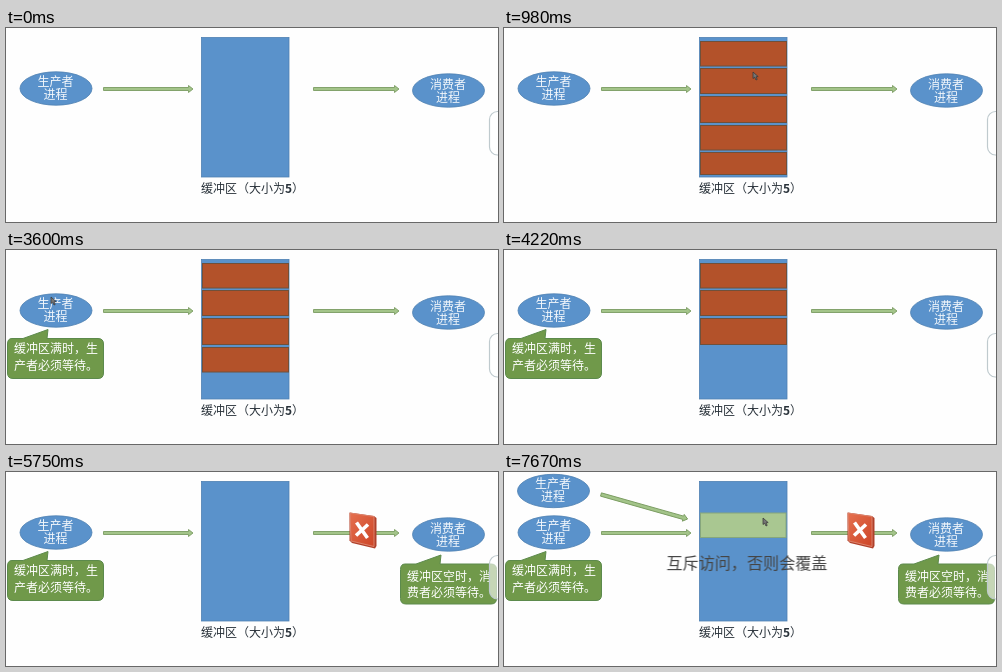
An HTML page for the animation above (8.3 s loop, 492 by 194 pixels).

```html
<!DOCTYPE html>
<html lang="zh">
<head>
<meta charset="utf-8">
<title>生产者与消费者</title>
<style>
html, body { margin: 0; width: 100%; height: 100%; overflow: hidden; background: #fefefe; }
svg { display: block; width: 492px; height: 194px; font: 12px "Noto Sans CJK SC", "Noto Sans CJK", sans-serif; }
.blue { fill: #5a92cb; stroke: #4f80b2; stroke-width: .8; }
.name { fill: #f4f8fc; text-anchor: middle; }
.caption { fill: #29323a; font-weight: 500; }
.caption tspan { font-weight: 700; }
.arrow { fill: #a3c489; stroke: #7b9c62; stroke-width: .9; }
.block { fill: #b3522a; stroke: #70503a; }
.slot { fill: #a9c791; stroke: #86a67c; }
.bubble use { fill: #70994a; stroke: #5c8a4c; }
.bubble text { fill: #fff; }
.note { font-size: 16.1px; fill: #454545; }
.cursor { fill: #777; stroke: #333; stroke-width: .7; }
.tab { fill: #fff; fill-opacity: .6; stroke: #bfcace; stroke-width: 1.2; }

/* Every part switches hard on the shared 8.3 s clock. */
.on { opacity: 0; animation: 8.3s step-end infinite; }
.b1 { animation-name: b1; } .b2, .b3 { animation-name: b23; }
.b4 { animation-name: b4; } .b5 { animation-name: b5; }
.stop-in { animation-name: stopIn; } .full { animation-name: full; }
.stop-out { animation-name: stopOut; } .empty { animation-name: empty; }
.second { animation-name: second; } .share { animation-name: share; }
.mouse { animation-name: mouse; }
@keyframes b1 { 0%, 53.25% { opacity: 0 } 8.19% { opacity: 1 } }
@keyframes b23 { 0%, 52.04% { opacity: 0 } 9.39% { opacity: 1 } }
@keyframes b4 { 0%, 50.84% { opacity: 0 } 10.6% { opacity: 1 } }
@keyframes b5 { 0%, 43.37% { opacity: 0 } 11.8% { opacity: 1 } }
@keyframes stopIn { 0%, 34.93% { opacity: 0 } 19.27% { opacity: 1 } }
@keyframes full { 0% { opacity: 0 } 27.22%, 100% { opacity: 1 } }
@keyframes stopOut { 0% { opacity: 0 } 60.96%, 100% { opacity: 1 } }
@keyframes empty { 0% { opacity: 0 } 69.27%, 100% { opacity: 1 } }
@keyframes second { 0% { opacity: 0 } 77.1%, 100% { opacity: 1 } }
@keyframes share { 0% { opacity: 0 } 85.06%, 100% { opacity: 1 } }
@keyframes mouse {
  0%, 19.27%, 50.84%, 85.06% { opacity: 0; transform: none }
  11.8% { opacity: 1; transform: translate(249px, 44px) }
  43.37% { opacity: 1; transform: translate(45px, 47px) }
  77.1% { opacity: 1; transform: translate(39px, 63px) }
  92.4%, 100% { opacity: 1; transform: translate(259px, 46px) }
}
.note { animation: shift 8.3s step-end infinite; }
@keyframes shift { 0% { transform: none } 85.06%, 100% { transform: translate(-2.5px, -6px) } }
</style>
</head>
<body>
<svg viewBox="0 0 492 194">
  <defs>
    <linearGradient id="red" x1="0" y1="0" x2="1" y2="1">
      <stop offset="0" stop-color="#e5704f"/>
      <stop offset="1" stop-color="#cd4527"/>
    </linearGradient>
    <g id="producer">
      <ellipse class="blue" cx="50" cy="60.5" rx="36" ry="16.7"/>
      <text class="name" x="49.5" y="57.5">生产者</text>
      <text class="name" x="49.5" y="70.5">进程</text>
    </g>
    <g id="stop">
      <path d="M.5 .5 L25 4 L27.5 6 V34 L26 36.5 L3 31 L.5 28.5Z" fill="#b0402a"/>
      <path d="M1 1 L25 4.5 V34.5 L2 29Z" fill="url(#red)" stroke="#e08a72" stroke-width=".9"/>
      <path d="M7.5 10.5 L18.5 26 M19 12.5 L7 23.5" fill="none" stroke="#fff" stroke-width="3.6"/>
    </g>
    <path id="balloon" d="M6 88.5 H17 L42 79.5 L41 88.5 H92 Q97.5 88.5 97.5 94 V123 Q97.5 128.5 92 128.5 H7 Q1.5 128.5 1.5 123 V94 Q1.5 88.5 6 88.5Z"/>
  </defs>

  <use href="#producer"/>
  <ellipse class="blue" cx="442.5" cy="62.5" rx="36" ry="16.7"/>
  <text class="name" x="442" y="60.5">消费者</text>
  <text class="name" x="442" y="74">进程</text>

  <path class="arrow" d="M97.5 59.5 H182.5 V57.5 L187 61 L182.5 64.5 V62.5 H97.5Z"/>
  <path class="arrow" d="M307.5 59.5 H388.5 V57.5 L393 61 L388.5 64.5 V62.5 H307.5Z"/>

  <rect class="blue" x="195.5" y="9.5" width="87.5" height="139.5"/>
  <rect class="block on b1" x="196.5" y="13.5" width="86" height="24.5"/>
  <rect class="block on b2" x="196.5" y="40.5" width="86" height="25"/>
  <rect class="block on b3" x="196.5" y="68.5" width="86" height="26"/>
  <rect class="block on b4" x="196.5" y="97.5" width="86" height="24.5"/>
  <rect class="block on b5" x="196.5" y="124.5" width="86" height="22"/>
  <rect class="slot on share" x="196.5" y="41" width="85.5" height="24.5"/>
  <text class="caption" x="195" y="165">缓冲区（大小为<tspan>5</tspan>）</text>

  <use class="on stop-in" href="#stop" x="138" y="43"/>
  <use class="on stop-out" href="#stop" x="343" y="40"/>

  <g class="bubble on full">
    <use href="#balloon"/>
    <text x="8" y="103">缓冲区满时，生</text>
    <text x="8" y="119.5">产者必须等待。</text>
  </g>
  <g class="bubble on empty">
    <use href="#balloon" x="393" y="3.5"/>
    <text x="401" y="109">缓冲区空时，消</text>
    <text x="401" y="125">费者必须等待。</text>
  </g>

  <g class="on second">
    <use href="#producer" x="-.5" y="-41.5"/>
    <path class="arrow" transform="translate(97 22.5) rotate(15.8)" d="M0 -1.7 H85.5 V-3.5 L90 0 L85.5 3.5 V1.7 H0Z"/>
    <text class="note" x="165" y="103">互斥访问，否则会覆盖</text>
  </g>

  <rect class="tab" x="483.5" y="83.5" width="24" height="43.5" rx="8"/>
  <path class="cursor on mouse" d="M0 0 L0 6.5 L1.7 5.2 L3 8 L4.2 7.4 L3 4.8 L5.2 4.6Z"/>
</svg>
</body>
</html>
```
